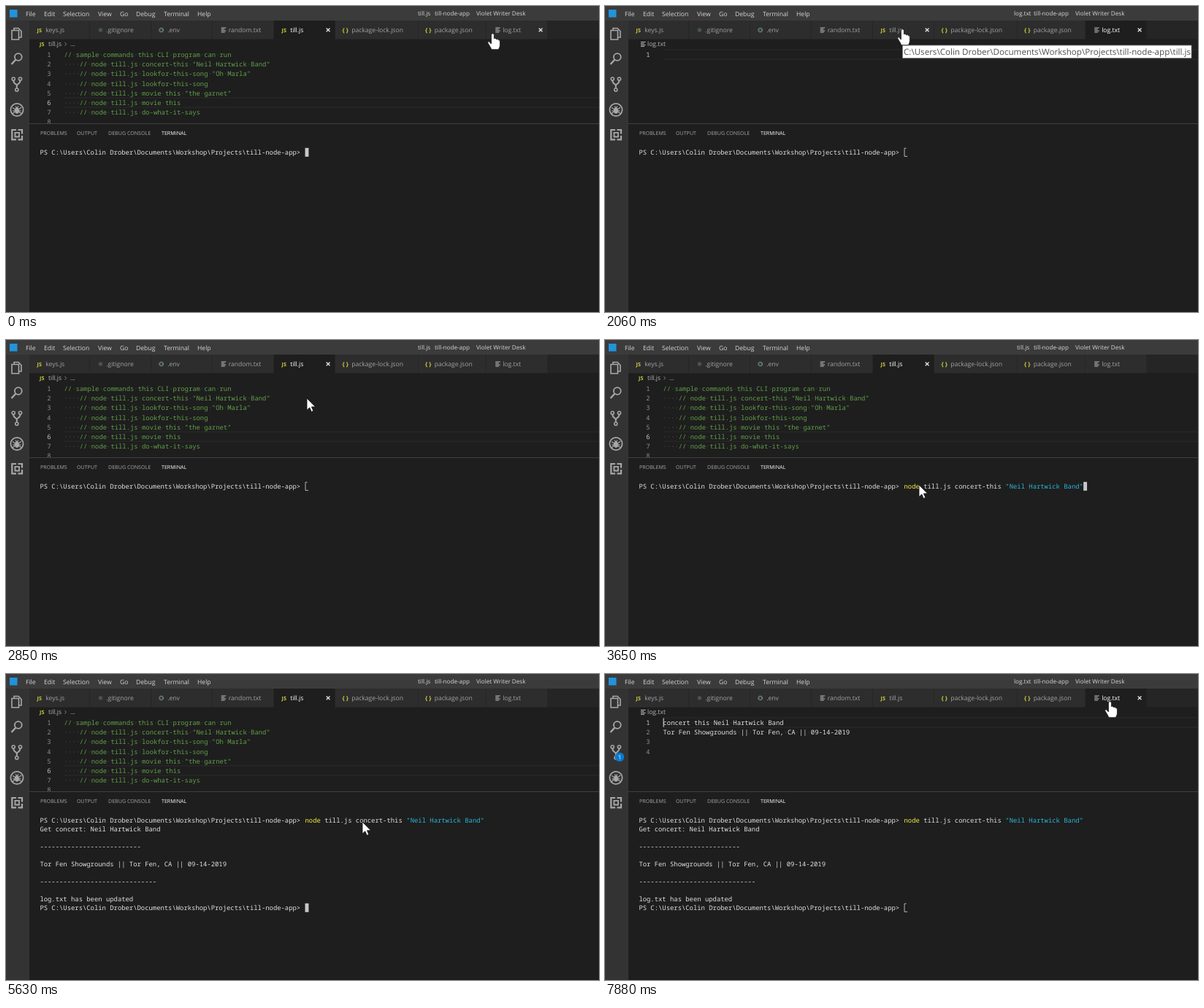
Write an HTML page that moves like this. It is 812 px wide and 420 px high and loops after 8 s.

```html
<!DOCTYPE html>
<html lang="en">
<head>
<meta charset="utf-8">
<title>Editor session</title>
<style>
  html, body { margin: 0; width: 100%; height: 100%; overflow: hidden; background: #1e1e1e; }
  svg { display: block; width: 812px; height: 420px; }
  text { white-space: pre; text-rendering: geometricPrecision; font-family: "Open Sans", "Noto Sans", sans-serif; }
  .menu { font-size: 8.6px; fill: #d6d6d6; }
  .title { font-size: 8.1px; fill: #d6d6d6; }
  .tab { font-size: 8.6px; fill: #a2a2a2; }
  .crumb { font-size: 8.6px; fill: #b4b4b4; }
  .panel { font-size: 7.1px; fill: #a6a6a6; }
  .tip { font-size: 11.6px; fill: #505050; }
  .js { font-size: 7.2px; font-weight: 700; fill: #cbcb41; }
  .braces { font-size: 8px; font-weight: 700; fill: #cbcb41; }
  .mono { font: 8.9px "Noto Sans Mono", "DejaVu Sans Mono", monospace; fill: #e0e0e0; }
  .num { fill: #8c8c8c; text-anchor: end; }
  .comment { fill: #609f48; }
  .dots { fill: #505050; }
  .badge { font-size: 8px; fill: #fff; text-anchor: middle; }
</style>
</head>
<body>
<script>
const LOOP = 8000;
const CHAR = 5.34;
const FILE = 'till.js', APP = 'till-node-app', BAND = 'Neil Hartwick Band';
const FOLDER = `C:\\Users\\Colin Drober\\Documents\\Workshop\\Projects\\${APP}`;
const SHOW = 'Tor Fen Showgrounds || Tor Fen, CA || 09-14-2019';

function el(parent, tag, attrs = {}) {
  const node = document.createElementNS('http://www.w3.org/2000/svg', tag);
  for (const key in attrs) node.setAttribute(key, attrs[key]);
  parent.append(node);
  return node;
}
const group = (parent, attrs) => el(parent, 'g', attrs);
const rect = (parent, x, y, width, height, fill) => el(parent, 'rect', { x, y, width, height, fill });
const stroke = (parent, d, color, width = 1) =>
  el(parent, 'path', { d, fill: 'none', stroke: color, 'stroke-width': width });
function text(parent, x, y, string, cls) {
  const node = el(parent, 'text', { x, y, class: cls });
  node.textContent = string;
  return node;
}
const show = (node, on) => node.setAttribute('visibility', on ? 'inherit' : 'hidden');

const svg = el(document.body, 'svg', { viewBox: '0 0 812 420', width: 812, height: 420 });
rect(svg, 0, 0, 812, 420, '#1e1e1e');

// Title bar
rect(svg, 0, 0, 812, 20, '#3b3b3c');
rect(svg, 5, 5, 10.5, 10.5, '#2193db');
[['File', 27], ['Edit', 52], ['Selection', 78], ['View', 126], ['Go', 156],
 ['Debug', 178], ['Terminal', 216], ['Help', 262]].forEach(([s, x]) => text(svg, x, 13.6, s, 'menu'));
const title = text(svg, 564, 13.4, FILE, 'title');
text(svg, 587, 13.4, APP, 'title');
text(svg, 644, 13.4, 'Violet Writer Desk', 'title');

// Activity bar
rect(svg, 0, 20, 32, 400, '#333');
const ICON = '#a8a8a8';
stroke(svg, 'M11 33V30.5H17L21 34.5V43H18', ICON, 1.6);
stroke(svg, 'M8 33.5H17.5V46H8Z', ICON, 1.6);
el(svg, 'circle', { cx: 16.8, cy: 70, r: 4.9, fill: 'none', stroke: ICON, 'stroke-width': 1.8 });
stroke(svg, 'M13.2 73.8L7.5 80', ICON, 2.4);
[[10.2, 100], [19.5, 100], [14.8, 115]].forEach(([cx, cy]) =>
  el(svg, 'circle', { cx, cy, r: 2.1, fill: 'none', stroke: ICON, 'stroke-width': 1.5 }));
stroke(svg, 'M10.2 102.3Q10.2 105.5 14.8 108.5Q19.5 105.5 19.5 102.3M14.8 108V112.8', ICON, 2);
el(svg, 'circle', { cx: 15, cy: 142.5, r: 8.6, fill: 'none', stroke: ICON, 'stroke-width': 1.7 });
el(svg, 'ellipse', { cx: 15, cy: 143.5, rx: 3, ry: 4.3, fill: ICON });
stroke(svg, 'M9 139.5L21 147.5M9 148L12 145M21 139L18 141.5M9.5 143.8H20.5M13 137.5L15 140L17 137.5', ICON, 1.2);
stroke(svg, 'M14 170H8.3V183.3H14M16.5 170H22V175.5M22 178V183.3H16.5', ICON, 2.2);
stroke(svg, 'M12.4 173.9H18V179.5H12.4Z', ICON, 1.8);

const badge = group(svg);
el(badge, 'circle', { cx: 20, cy: 114, r: 6.2, fill: '#0a7bd0' });
const clock = group(badge);
el(clock, 'circle', { cx: 20, cy: 114, r: 3.7, fill: 'none', stroke: '#fff', 'stroke-width': 1 });
stroke(clock, 'M20 111.5V114.3H22.3', '#fff');
const count = text(badge, 20, 117, '1', 'badge');

// File icons
function linesIcon(parent, x, y) {
  stroke(parent, `M${x} ${y - 3}h6.5m-6.5 2h4.5m-4.5 2h6.5m-6.5 2h5`, '#b8bcbe', 1.1);
}
const icons = {
  js: (p, x, y) => text(p, x, y + 2.7, 'JS', 'js'),
  json: (p, x, y) => text(p, x - 1, y + 2.6, '{ }', 'braces'),
  txt: linesIcon,
  dot: (p, x, y) => el(p, 'circle', { cx: x + 4, cy: y, r: 2.8, fill: '#465258' }),
  gear: (p, x, y) => el(p, 'circle', { cx: x + 3.2, cy: y, r: 2.5, fill: 'none', stroke: '#6d8086',
    'stroke-width': 2, 'stroke-dasharray': '1.5 .5' })
};

// Tabs: label, kind, left edge, right edge
rect(svg, 32, 20, 780, 25.5, '#252526');
const tabs = {};
[['keys.js', 'js', 32, 115], ['.gitignore', 'dot', 115, 199], ['.env', 'gear', 199, 282.5],
 ['random.txt', 'txt', 282.5, 367], [FILE, 'js', 367, 451], ['package-lock.json', 'json', 451, 564.5],
 ['package.json', 'json', 564.5, 658], ['log.txt', 'txt', 658, 742]].forEach(([name, kind, left, right]) => {
  const back = rect(svg, left, 20, right - left - .7, 25.5, '#2d2d2d');
  icons[kind](svg, left + (kind === 'txt' ? 12.2 : 10.5), 33);
  tabs[name] = { back, label: text(svg, left + 22.2, 36, name, 'tab'),
    close: stroke(svg, `M${right - 12.3} 30.5l4.8 4.8m0 -4.8l-4.8 4.8`, '#e4e4e4', 1.3) };
  show(tabs[name].close, false);
});
function setTab(name, active, close) {
  const tab = tabs[name];
  tab.back.setAttribute('fill', active ? '#1e1e1e' : '#2d2d2d');
  tab.label.style.fill = active ? '#fff' : '';
  show(tab.close, close);
}

// Editor pages
const lineY = i => 70 + 13.2 * i;
function codeLine(parent, i, string, cls = '') {
  text(parent, 79.5, lineY(i), string.replace(/./g, c => c === ' ' ? '·' : ' '), 'mono dots');
  text(parent, 79.5, lineY(i), string, 'mono ' + cls);
}
function page(count, current) {
  const g = group(svg);
  const marker = stroke(g, `M80 ${lineY(current) - 10}H812M80 ${lineY(current) + 3.2}H812`, '#2b2b2b');
  for (let i = 0; i < count; i++) {
    const n = text(g, 61.5, lineY(i), i + 1, 'mono num');
    if (i === current) n.style.fill = '#c6c6c6';
  }
  return { g, marker };
}
const caretAt = (parent, col, i) => rect(parent, 79.6 + col * CHAR, lineY(i) - 9.5, 1.1, 12.4, '#d0d0d0');

const source = page(8, 5);
codeLine(source.g, 0, '// sample commands this CLI program can run', 'comment');
[`concert-this "${BAND}"`, 'lookfor-this-song "Oh Marla"', 'lookfor-this-song',
 'movie this "the garnet"', 'movie this', 'do-what-it-says'].forEach((s, i) =>
  codeLine(source.g, i + 1, `    // node ${FILE} ${s}`, 'comment'));
icons.js(source.g, 46, 52.3);
text(source.g, 58, 55, FILE, 'crumb');
stroke(source.g, 'M80.5 50l2 2.3l-2 2.3', '#8c8c8c', .9);
text(source.g, 88, 55, '...', 'crumb');
const sourceCaret = caretAt(source.g, 30, 5);

const log = page(1, 0);
linesIcon(log.g, 49, 52.5);
text(log.g, 58, 55, 'log.txt', 'crumb');
const logEntry = group(log.g);
codeLine(logEntry, 0, `concert this ${BAND}`);
codeLine(logEntry, 1, SHOW);
[1, 2, 3].forEach(i => text(logEntry, 61.5, lineY(i), i + 1, 'mono num'));
const logCaret = caretAt(log.g, 0, 0);

// Panel and terminal
rect(svg, 32, 161, 780, 259, '#1e1e1e');
rect(svg, 32, 161, 780, 1, '#414141');
[['PROBLEMS', 47], ['OUTPUT', 97], ['DEBUG CONSOLE', 140]].forEach(([s, x]) => text(svg, x, 177, s, 'panel'));
text(svg, 213, 177, 'TERMINAL', 'panel').style.fill = '#fff';

const rowY = i => 204 + 12 * i;
const column = n => 46.4 + n * CHAR;
const termLine = (parent, i, string, col = 0) => text(parent, column(col), rowY(i), string, 'mono');
const PROMPT = `PS ${FOLDER}> `;
termLine(svg, 0, PROMPT);
const command = group(svg);
termLine(command, 0, 'node', 68).style.fill = '#f0f040';
termLine(command, 0, `${FILE} concert-this`, 73);
termLine(command, 0, `"${BAND}"`, 94).style.fill = '#29b4d6';

const output = [
  [4560, [[1, `Get concert: ${BAND}`]]],
  [4830, [[3, '-'.repeat(26)], [5, SHOW]]],
  [5370, [[7, '-'.repeat(30)], [9, 'log.txt has been updated'], [10, PROMPT]]]
].map(([at, rows]) => {
  const g = group(svg);
  rows.forEach(([i, s]) => termLine(g, i, s));
  return { at, g };
});
const cursor = group(svg);
const block = rect(cursor, 0, -9.2, 4.9, 12, '#c8c8c8');
const hollow = stroke(cursor, 'M3 -8.8H.5V2.4H4.6', '#c4c4c4', .9);

// Tooltip and pointer
const tip = group(svg);
el(tip, 'rect', { x: 407.5, y: 54, width: 395.5, height: 17.5, fill: '#fff', stroke: '#888', 'stroke-width': .8 });
text(tip, 409, 66.8, `${FOLDER}\\${FILE}`, 'tip');

const shape = { fill: '#fff', stroke: '#161616', 'stroke-width': .8, 'stroke-linejoin': 'round' };
const hand = group(svg);
el(hand, 'path', { ...shape, transform: 'translate(-1.6 -.6) scale(1 1.04)',
  d: 'M-2 1.5Q0 -1 2 1.5V7Q4 5.5 5 8Q7 6.8 8 9Q10 8.2 10 11V16Q10 18 8 21.5H-1.5Q-3 18 -6.5 13Q-7.5 10.5 -5 11L-2 14Z' });
const arrow = el(svg, 'path', { ...shape, d: 'M0 0V16.2L3.8 12.8L6.2 18.4L8.8 17.2L6.4 11.8H11.6Z' });

// Pointer positions, each held until the next: time, x, y
const pointer = [
  [0, 668, 38], [100, 672, 38], [200, 678, 38], [960, 575, 34], [1120, 490, 24], [1250, 425, 26],
  [1390, 409, 32], [2730, 412, 80], [2860, 425, 165], [2990, 432, 211], [3110, 430, 199],
  [5110, 464, 218], [5230, 488, 216], [5370, 488, 203], [6280, 560, 115], [6410, 638, 36],
  [6550, 690, 41], [6850, 693, 38]
];
const between = (t, a, b) => t >= a && t < b;

function draw(t) {
  const logOpen = between(t, 290, 2190) || t >= 7110;
  const secondVisit = t >= 7110;
  const focused = t < 290 || between(t, 3110, 7110);

  setTab(FILE, !logOpen, !logOpen || between(t, 1390, 2190));
  setTab('log.txt', logOpen, logOpen || t < 290 || t >= 6850);
  const logTitle = between(t, 540, 2190) || t >= 7380;
  title.textContent = logTitle ? 'log.txt' : FILE;
  title.setAttribute('x', logTitle ? 560 : 564);

  show(source.g, !logOpen);
  show(source.marker, !between(t, 2190, 2450));
  show(sourceCaret, between(t, 2190, 2730));
  show(log.g, logOpen);
  show(logEntry, secondVisit);
  show(logCaret, secondVisit || between(t, 290, 540) || between(t, 1120, 1800));

  show(badge, t >= 6550);
  show(clock, t < 7380);
  show(count, t >= 7380);

  show(command, t >= 3400);
  output.forEach(({ at, g }) => show(g, t >= at));
  const done = t >= 5370;
  const col = done || t < 3400 ? 68 : 114;
  cursor.setAttribute('transform', `translate(${column(col)} ${rowY(done ? 10 : 0)})`);
  show(cursor, !between(t, 4300, 5370));
  show(block, focused);
  show(hollow, !focused);

  tip.setAttribute('opacity', between(t, 1800, 2330) ? 1 : between(t, 1660, 2450) ? .48 : 0);

  const [, x, y] = pointer.findLast(key => key[0] <= t);
  const place = `translate(${x} ${y})`;
  hand.setAttribute('transform', place);
  arrow.setAttribute('transform', place);
  show(hand, y < 46);
  show(arrow, y >= 46);
}

let start;
function tick(now) {
  start ??= now;
  draw((now - start) % LOOP);
  requestAnimationFrame(tick);
}
draw(0);
requestAnimationFrame(tick);
</script>
</body>
</html>
```
